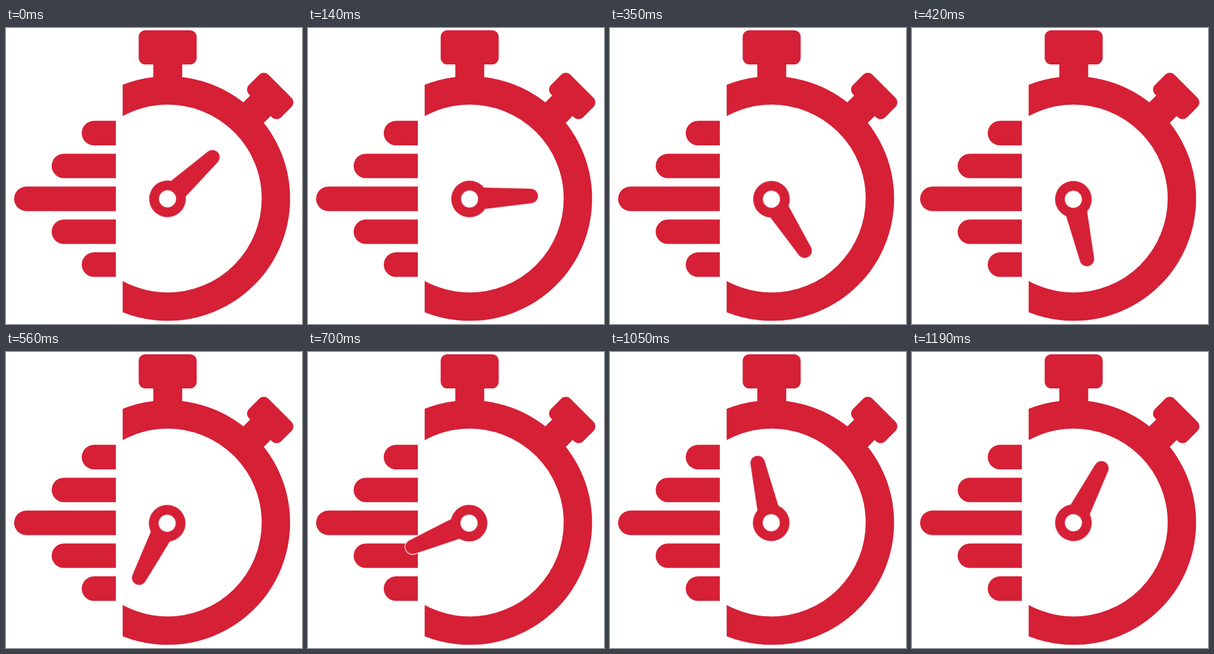
An HTML page that plays this animation: 512x512 px, repeating every 1.26 s.

```html
<!DOCTYPE html>
<html lang="en">
<head>
<meta charset="utf-8">
<title>Stopwatch</title>
<style>
  html, body { margin: 0; width: 100%; height: 100%; overflow: hidden; background: #fff; }
  svg { display: block; width: 100%; height: 100%; fill: #d52036; }
  .hand { animation: turn 1260ms steps(18) infinite; }
  .halo { stroke: #fff; stroke-width: 2.4; }
  .hole { fill: #fff; }
  /* 0deg points to three o'clock */
  @keyframes turn {
    from { transform: rotate(-42.8deg); }
    to { transform: rotate(317.2deg); }
  }
</style>
</head>
<body>
<svg viewBox="0 0 512 512">
  <defs>
    <clipPath id="dial"><rect x="201.8" y="0" width="311" height="512"/></clipPath>
    <clipPath id="trail"><rect x="0" y="0" width="190" height="512"/></clipPath>
  </defs>

  <circle cx="279.8" cy="295" r="187.05" fill="none" stroke="#d52036" stroke-width="49.1" clip-path="url(#dial)"/>
  <rect x="229.5" y="4" width="100.3" height="59" rx="11.5"/>
  <rect x="254.8" y="60" width="50" height="32"/>
  <g transform="translate(457 117.6) rotate(45)">
    <rect x="-39.45" y="-23.85" width="78.9" height="47.7" rx="11.5"/>
    <rect x="-25" y="20" width="50" height="28"/>
  </g>

  <g clip-path="url(#trail)">
    <rect x="131" y="160.6" width="100" height="42.4" rx="21.2"/>
    <rect x="79" y="217.4" width="150" height="42.4" rx="21.2"/>
    <rect x="14" y="274.3" width="220" height="42.4" rx="21.2"/>
    <rect x="79" y="331.2" width="150" height="42.4" rx="21.2"/>
    <rect x="131" y="388.1" width="100" height="42.4" rx="21.2"/>
  </g>

  <g transform="translate(279 295.8)">
    <g class="hand">
      <path class="halo" d="M20 -19.1 L107.4 -12.46 A12.5 12.5 0 0 1 107.4 12.46 L20 19.1 Z"/>
      <path d="M20 -19.1 L107.4 -12.46 A12.5 12.5 0 0 1 107.4 12.46 L20 19.1 Z"/>
      <circle cx="0.5" r="31.7"/>
      <circle class="hole" cx="0.5" r="14.8"/>
    </g>
  </g>
</svg>
</body>
</html>
```
